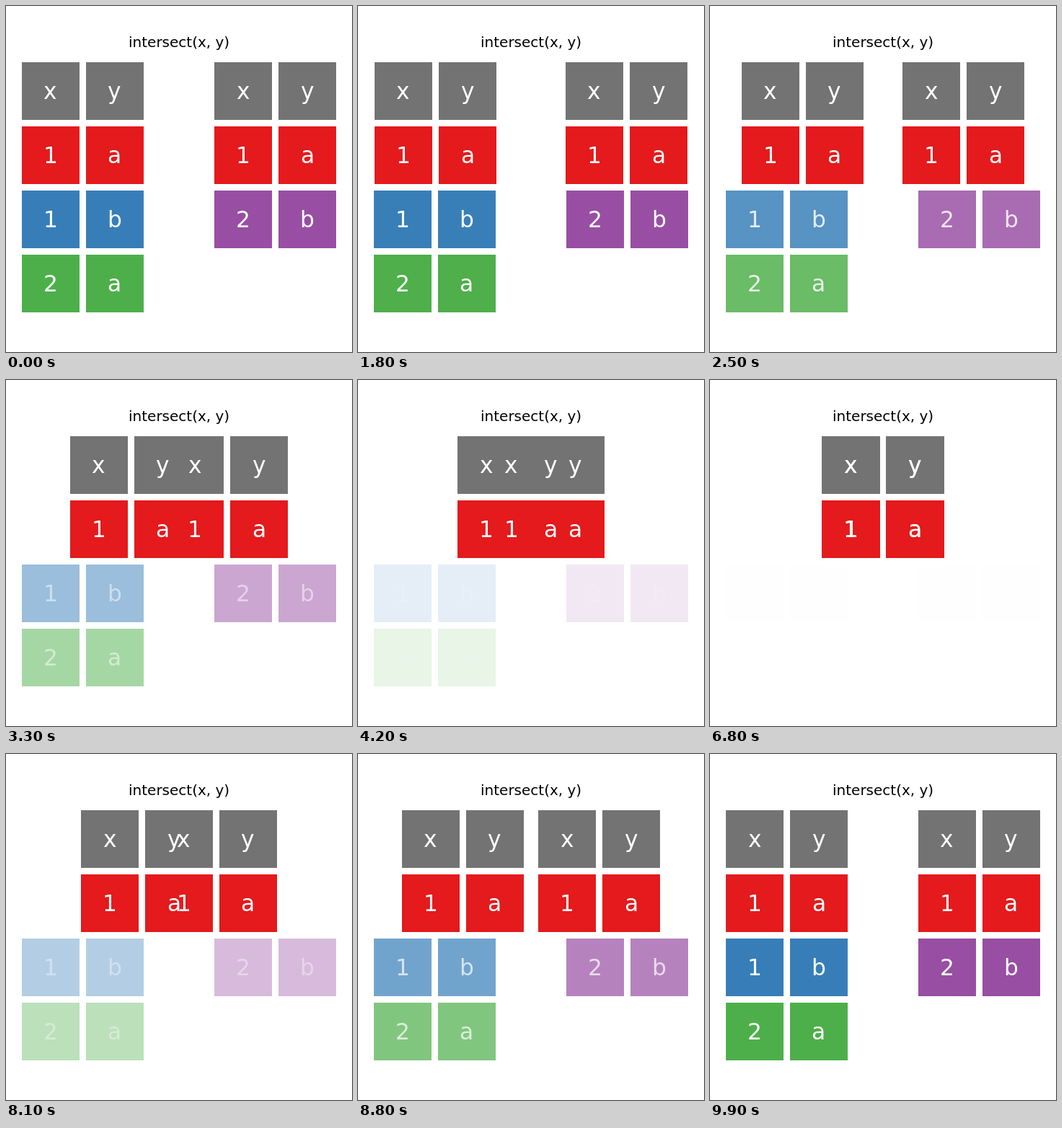
Write an HTML page with a canvas that moves like this. It is 480x480 px and loops after 10000 ms.

```html
<!DOCTYPE html>
<html lang="en">
<head>
<meta charset="utf-8">
<title>intersect(x, y)</title>
<style>
  html, body { margin: 0; width: 100%; height: 100%; overflow: hidden; background: #fff; }
  canvas { display: block; }
</style>
</head>
<body>
<canvas width="480" height="480"></canvas>
<script>
const ctx = document.querySelector('canvas').getContext('2d');
const FONT = '"DejaVu Sans", Verdana, sans-serif';
const LOOP = 10000, STEP = 100;
const PITCH = 89.1, HALF = PITCH * 0.45;
const GREY = '#737373', RED = '#e41a1c', BLUE = '#377eb8', GREEN = '#4daf4a', PURPLE = '#984ea3';

// Each table: start column, end column and rows of [colour, labels, kept in the result]
const tables = [
  { from: -2, rows: [[GREY, 'xy', true], [RED, '1a', true], [BLUE, '1b'], [GREEN, '2a']] },
  { from: 1, rows: [[GREY, 'xy', true], [RED, '1a', true], [PURPLE, '2b']] }
];
const END = -0.5;

const cells = tables.flatMap(({ from, rows }) =>
  rows.flatMap(([color, labels, kept], row) =>
    [...labels].map((label, i) => ({ color, label, kept, row, from: from + i, to: END + i }))));

const ease = p => (1 - Math.cos(Math.PI * Math.min(1, Math.max(0, p)))) / 2;

// 0 = two separate tables, 1 = merged result
const merged = t => t < 6700 ? ease((t - 1600) / 3400) : 1 - ease((t - 6700) / 3300);

function drawTile(cell, x) {
  const y = 118 + cell.row * PITCH;
  const left = Math.round(x - HALF), top = Math.round(y - HALF);
  ctx.fillStyle = cell.color;
  ctx.fillRect(left, top, Math.round(x + HALF) - left, Math.round(y + HALF) - top);
}

function drawLabel({ label, row }, x) {
  const width = Math.round(ctx.measureText(label).width);
  ctx.fillStyle = '#fff';
  ctx.fillText(label, Math.round(x - width / 2), 129 + 89 * row);
}

function draw(t) {
  const m = merged(t);
  ctx.globalAlpha = 1;
  ctx.fillStyle = '#fff';
  ctx.fillRect(0, 0, 480, 480);
  ctx.fillStyle = '#000';
  ctx.font = `20px ${FONT}`;
  ctx.fillText('intersect(x, y)', 170, 57);

  ctx.font = `31.3px ${FONT}`;
  for (const paint of [drawTile, drawLabel]) {
    for (const cell of cells) {
      const col = cell.kept ? cell.from + (cell.to - cell.from) * m : cell.from;
      ctx.globalAlpha = cell.kept ? 1 : 1 - m;
      paint(cell, 240 + col * PITCH);
    }
  }
}

const start = performance.now();
function tick() {
  const t = (performance.now() - start) % LOOP;
  draw(Math.floor(t / STEP) * STEP);
  requestAnimationFrame(tick);
}
tick();
</script>
</body>
</html>
```
